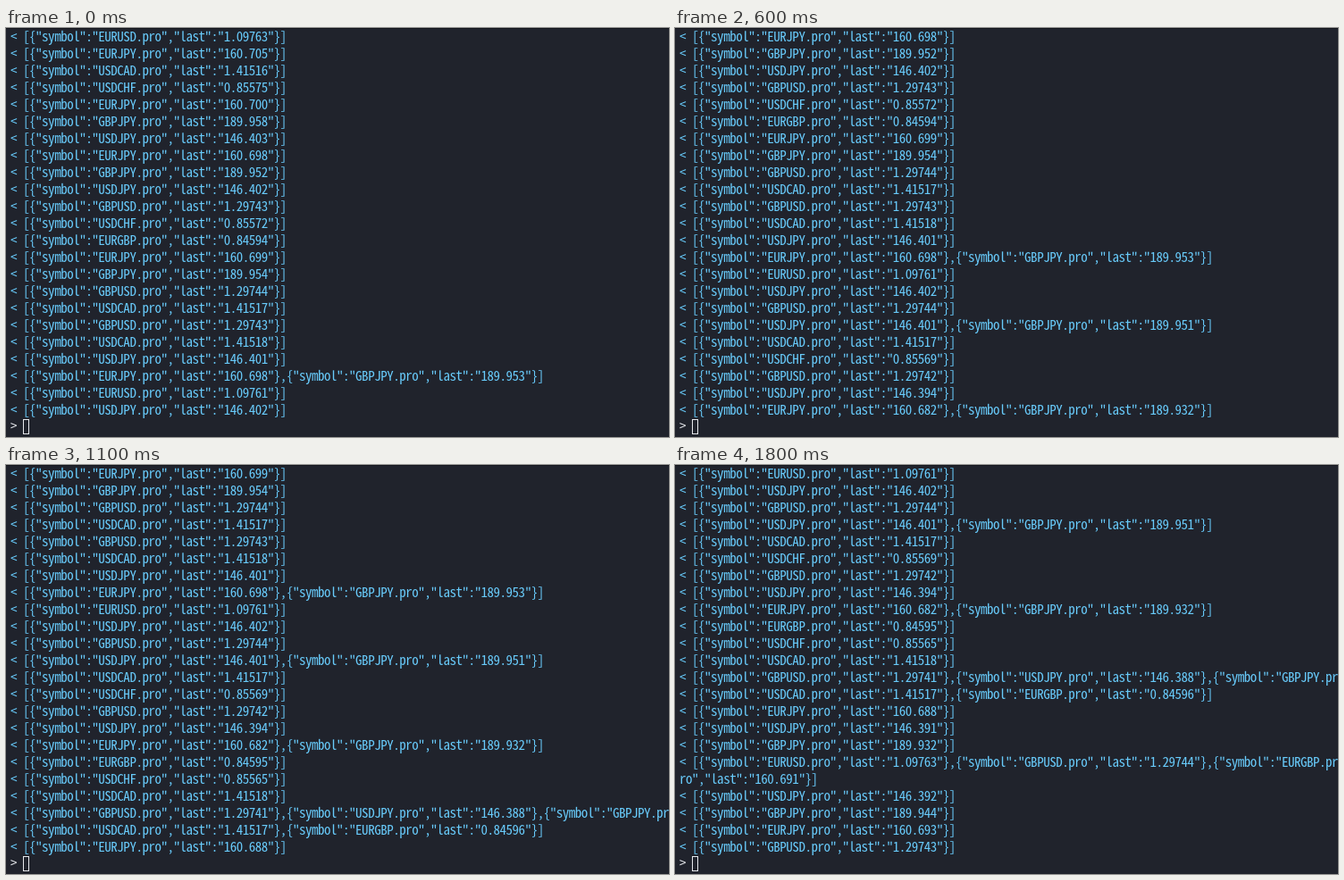
An HTML page for the animation above (1.9 s loop, 742 px wide and 458 px high).

```html
<!DOCTYPE html>
<html lang="en">
<meta charset="utf-8">
<title>Price feed</title>
<style>
  html, body { margin: 0; width: 100%; height: 100%; overflow: hidden; background: #20232c; }
  #screen {
    position: relative; width: 742px; height: 458px; overflow: hidden;
    box-sizing: border-box; border-top: 1px solid #15171e;
    font: 15px/19px "Noto Sans Mono CJK JP", "Noto Sans Mono CJK SC", "Noto Sans Mono", monospace;
    letter-spacing: -0.48px; font-variant-ligatures: none; color: #68cbfb;
  }
  pre { position: absolute; left: 5px; margin: 0; font: inherit; }
  #log { top: -2px; }
  #prompt { top: 434px; color: #e6e8ec; }
  #cursor {
    position: absolute; left: 19px; top: 437px; width: 7px; height: 17px;
    box-sizing: border-box; border: 1px solid #e6e8ec;
  }
</style>
<div id="screen">
  <pre id="log"></pre>
  <pre id="prompt">&gt;</pre>
  <div id="cursor"></div>
</div>
<script>
const ROWS = 23, COLUMNS = 145, STEP = 100;

// One message per line; quotes within a message are separated by commas.
const messages = `EURUSD 1.09763
EURJPY 160.705
USDCAD 1.41516
USDCHF 0.85575
EURJPY 160.700
GBPJPY 189.958
USDJPY 146.403
EURJPY 160.698
GBPJPY 189.952
USDJPY 146.402
GBPUSD 1.29743
USDCHF 0.85572
EURGBP 0.84594
EURJPY 160.699
GBPJPY 189.954
GBPUSD 1.29744
USDCAD 1.41517
GBPUSD 1.29743
USDCAD 1.41518
USDJPY 146.401
EURJPY 160.698,GBPJPY 189.953
EURUSD 1.09761
USDJPY 146.402
GBPUSD 1.29744
USDJPY 146.401,GBPJPY 189.951
USDCAD 1.41517
USDCHF 0.85569
GBPUSD 1.29742
USDJPY 146.394
EURJPY 160.682,GBPJPY 189.932
EURGBP 0.84595
USDCHF 0.85565
USDCAD 1.41518
GBPUSD 1.29741,USDJPY 146.388,GBPJPY 189.930
USDCAD 1.41517,EURGBP 0.84596
EURJPY 160.688
USDJPY 146.391
GBPJPY 189.932
EURUSD 1.09763,GBPUSD 1.29744,EURGBP 0.84597,EURJPY 160.691
USDJPY 146.392
GBPJPY 189.944
EURJPY 160.693
GBPUSD 1.29743`.split("\n");

const toQuote = text => {
  const [pair, last] = text.split(" ");
  return { symbol: pair + ".pro", last };
};
const toLine = message => "< " + JSON.stringify(message.split(",").map(toQuote));
const wrap = line => line.match(new RegExp(`.{1,${COLUMNS}}`, "g"));
const lines = messages.map(toLine).flatMap(wrap);

// Rows scrolled off the top at each step.
const scrolled = [0, 1, 2, 3, 4, 5, 7, 8, 10, 11, 12, 13, 14, 15, 17, 18, 19, 20, 21];
const log = document.getElementById("log");
let shown = -1;

function draw(now) {
  const top = scrolled[Math.floor(now / STEP) % scrolled.length];
  if (top !== shown) {
    log.textContent = lines.slice(top, top + ROWS).join("\n");
    shown = top;
  }
  requestAnimationFrame(() => draw(performance.now()));
}
draw(performance.now());
</script>
</html>
```
